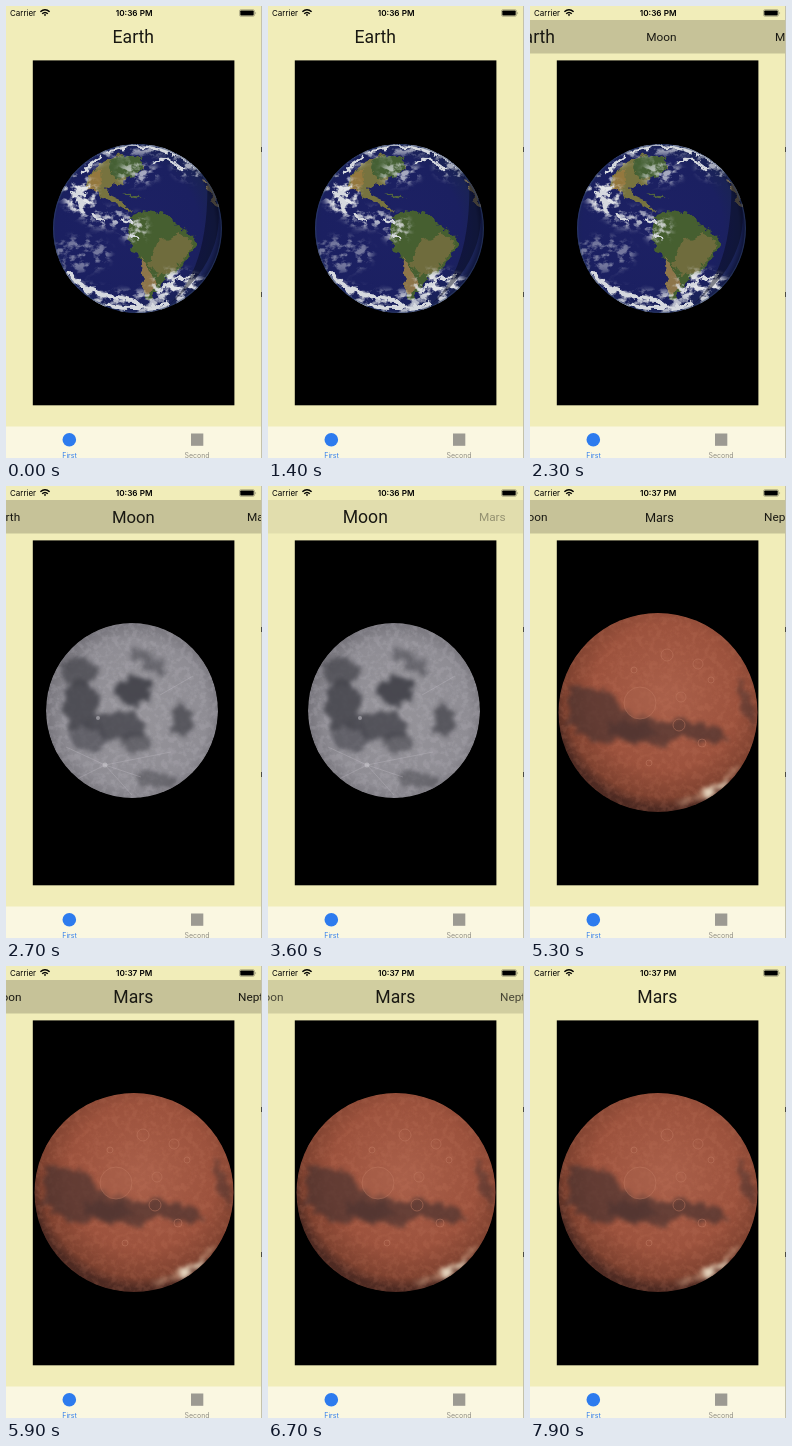
An HTML page for the animation above (8000 ms loop, 256 by 452 pixels).

```html
<!DOCTYPE html>
<html lang="en">
<head>
<meta charset="utf-8">
<title>Planet titles</title>
<style>
  html, body { margin: 0; width: 100%; height: 100%; overflow: hidden; background: #f1edb9; }
  svg { display: block; width: 100vw; height: 100vh; }
  text { text-anchor: middle; font-family: Inter, Roboto, sans-serif; }
  .title { font-family: Roboto, "Open Sans", sans-serif; fill: #191812; }
  .tab { font-size: 7px; }
  filter { color-interpolation-filters: sRGB; }
</style>
</head>
<body>
<svg viewBox="0 0 256 452" preserveAspectRatio="none">
  <defs>
    <filter id="rough" x="-20%" y="-20%" width="140%" height="140%">
      <feTurbulence type="fractalNoise" baseFrequency=".13" numOctaves="3" seed="4" result="noise"/>
      <feDisplacementMap in="SourceGraphic" in2="noise" scale="9" xChannelSelector="R" yChannelSelector="G"/>
      <feGaussianBlur stdDeviation=".6"/>
    </filter>
    <filter id="softRough" x="-30%" y="-30%" width="160%" height="160%">
      <feTurbulence type="fractalNoise" baseFrequency=".1" numOctaves="4" seed="9" result="noise"/>
      <feDisplacementMap in="SourceGraphic" in2="noise" scale="16" xChannelSelector="R" yChannelSelector="G"/>
      <feGaussianBlur stdDeviation="2"/>
    </filter>
    <!-- Noise patches that keep the colour of the shape they are applied to. -->
    <filter id="wisps" x="0" y="0" width="100%" height="100%">
      <feTurbulence type="fractalNoise" baseFrequency=".1 .14" numOctaves="4" seed="12"/>
      <feColorMatrix values="0 0 0 0 0  0 0 0 0 0  0 0 0 0 0  5 0 0 0 -2.3" result="mask"/>
      <feGaussianBlur in="SourceGraphic" stdDeviation="3"/>
      <feComposite in2="mask" operator="in"/>
    </filter>
    <filter id="specks" x="0" y="0" width="100%" height="100%">
      <feTurbulence type="fractalNoise" baseFrequency=".16" numOctaves="3" seed="7"/>
      <feColorMatrix values="0 0 0 0 0  0 0 0 0 0  0 0 0 0 0  4 0 0 0 -1.7" result="mask"/>
      <feComposite in="SourceGraphic" in2="mask" operator="in"/>
    </filter>
    <radialGradient id="sea" cx=".45" cy=".5" r=".55">
      <stop stop-color="#1d2164"/><stop offset=".75" stop-color="#1b2061"/>
      <stop offset=".92" stop-color="#1a2356"/><stop offset="1" stop-color="#0b1030"/>
    </radialGradient>
    <radialGradient id="rock" cx=".52" cy=".52" r=".52">
      <stop stop-color="#96949a"/><stop offset=".8" stop-color="#8f8d94"/><stop offset="1" stop-color="#76747b"/>
    </radialGradient>
    <radialGradient id="rust" cx=".54" cy=".42" r=".56">
      <stop stop-color="#aa604a"/><stop offset=".65" stop-color="#9c523d"/>
      <stop offset=".9" stop-color="#7f4230"/><stop offset="1" stop-color="#4e2a22"/>
    </radialGradient>
    <clipPath id="earthDisc"><circle cx="131.5" cy="222.5" r="84.5"/></clipPath>
    <clipPath id="moonDisc"><ellipse cx="126" cy="224.5" rx="86" ry="87.5"/></clipPath>
    <clipPath id="marsDisc"><circle cx="128" cy="226.5" r="99.5"/></clipPath>
  </defs>

  <rect width="256" height="452" fill="#f1edb9"/>
  <rect id="bar" y="14" width="256" height="33.5"/>
  <g id="titles"></g>

  <rect x="26.8" y="54.4" width="201.6" height="344.9"/>

  <g class="planet" clip-path="url(#earthDisc)">
    <circle cx="131.5" cy="222.5" r="85" fill="url(#sea)"/>
    <g filter="url(#rough)">
      <path fill="#77733f" d="M77 182 83 169 95 157 115 148 135 152 138 163 121 172 118 179 105 177 99 182 106 190 117 195 124 206 112 199 94 190 86 177Z"/>
      <path fill="#456034" d="M105 153 120 148 136 153 136 164 120 173 108 172 102 162Z"/>
      <path fill="#94783e" d="M80 180 87 167 95 162 96 178 90 186Z"/>
      <path fill="#465f30" d="M127 209 140 204 158 208 170 218 187 230 191 237 183 248 176 261 165 269 153 282 146 294 139 292 137 276 136 258 124 240 121 226Z"/>
      <path fill="#6f6c3d" d="M152 235 174 228 187 235 176 257 164 267 151 270 143 258Z"/>
      <path fill="#8d754a" d="M134 250 143 262 149 277 144 291 138 286Z"/>
      <path fill="#75694f" d="M198 174 207 180 216 202 209 199Z"/>
      <path fill="#53663f" d="M117 187 130 189 139 193 128 192Z"/>
    </g>
    <g fill="#e2e4e8" filter="url(#wisps)">
      <path d="M40 130H220V150Q190 155 150 150T90 160T40 200Z" opacity=".7"/>
      <ellipse cx="75" cy="190" rx="17" ry="20"/>
      <ellipse cx="100" cy="212" rx="22" ry="10" opacity=".8"/>
      <ellipse cx="128" cy="222" rx="14" ry="14" opacity=".8"/>
      <ellipse cx="132" cy="167" rx="20" ry="12" opacity=".7"/>
      <ellipse cx="185" cy="160" rx="18" ry="14" opacity=".7"/>
      <ellipse cx="75" cy="248" rx="30" ry="18" opacity=".45"/>
      <ellipse cx="170" cy="278" rx="26" ry="14"/>
      <path d="M40 250Q80 290 130 285T220 270V310H40Z" opacity=".8"/>
    </g>
    <g filter="url(#rough)" fill="none" stroke="#d6d9df" stroke-linecap="round">
      <path stroke-width="5" d="M62 267Q79 287 105 290T134 300"/>
      <path stroke-width="4" d="M90 297Q120 306 160 299"/>
      <path stroke-width="3" d="M154 286Q165 272 187 270"/>
      <path stroke-width="5" d="M68 187 79 188M74 195 77 205"/>
      <path stroke-width="3" d="M87 210 97 215M117 214 126 217M125 226 131 232"/>
      <path stroke-width="2.5" d="M101 146Q130 136 157 144T194 165M146 157 161 152 178 164M77 166 95 151"/>
    </g>
    <path d="M205 170Q235 250 150 308Q206 275 201 165Z" fill="#050818" opacity=".45"/>
    <circle cx="131.5" cy="222.5" r="84" fill="none" stroke="#33466f" stroke-width="1.5" opacity=".5"/>
  </g>

  <g class="planet" clip-path="url(#moonDisc)">
    <ellipse cx="126" cy="224.5" rx="86" ry="88" fill="url(#rock)"/>
    <rect x="40" y="137" width="172" height="175" fill="#bebcc4" opacity=".22" filter="url(#specks)"/>
    <g filter="url(#softRough)" fill="#44444b">
      <ellipse cx="74" cy="186" rx="18" ry="15" opacity=".75"/>
      <ellipse cx="128" cy="206" rx="18" ry="15" opacity=".95"/>
      <ellipse cx="75" cy="219" rx="18" ry="24" opacity=".85"/>
      <ellipse cx="113" cy="239" rx="27" ry="15" opacity=".8"/>
      <ellipse cx="82" cy="252" rx="17" ry="16" opacity=".6"/>
      <ellipse cx="176" cy="235" rx="11" ry="15" opacity=".75"/>
      <ellipse cx="130" cy="255" rx="15" ry="10" opacity=".6"/>
      <ellipse cx="151" cy="294" rx="21" ry="8" opacity=".5"/>
      <path d="M122 163 150 170 162 189 143 186Z" opacity=".55"/>
    </g>
    <g fill="none" stroke="#d0ced4" stroke-width=".8" opacity=".3">
      <path d="M99 279 60 261M99 279 67 295M99 279 126 309M99 279 165 266M99 279 135 291M154 209 187 190"/>
    </g>
    <g fill="#d2d0d6" opacity=".5"><circle cx="99" cy="279" r="2.5"/><circle cx="92" cy="232" r="2"/></g>
  </g>

  <g class="planet" clip-path="url(#marsDisc)">
    <circle cx="128" cy="226.5" r="100" fill="url(#rust)"/>
    <rect x="28" y="127" width="200" height="200" fill="#d08468" opacity=".14" filter="url(#specks)"/>
    <g filter="url(#softRough)" fill="#44302e">
      <path d="M40 198 78 205 92 222 122 235 155 233 192 244 195 256 153 251 132 260 91 255 61 257 38 237Z" opacity=".65"/>
      <path d="M76 234 110 238 131 246 110 255 80 250Z" opacity=".5"/>
      <path d="M207 190 224 215 222 241 212 227Z" opacity=".5"/>
    </g>
    <g fill="none" stroke="#c07b63" stroke-width="1" opacity=".5">
      <circle cx="110" cy="217" r="16" fill="#a7604a"/>
      <circle cx="137" cy="169" r="6"/><circle cx="168" cy="178" r="5"/><circle cx="151" cy="211" r="5"/>
      <circle cx="149" cy="239" r="6"/><circle cx="181" cy="194" r="3"/><circle cx="104" cy="184" r="3"/>
      <circle cx="172" cy="257" r="4"/><circle cx="119" cy="277" r="3"/>
    </g>
    <g filter="url(#softRough)" fill="none" stroke-linecap="round">
      <path d="M151 317Q185 309 208 280" stroke="#c69a7f" stroke-width="5" opacity=".6"/>
      <path d="M176 309 197 297" stroke="#eee0c8" stroke-width="5"/>
    </g>
  </g>

  <text x="17" y="10" font-size="8">Carrier</text>
  <g fill="none" stroke="#000" stroke-width="1.5">
    <path d="M34.4 5.8Q39 1.6 43.6 5.8M36.2 7.8Q39 5.2 41.8 7.8"/>
    <path d="M37.8 8.8 39 8 40.2 8.8 39 10.2Z" fill="#000" stroke="none"/>
  </g>
  <text id="clock" x="128.1" y="10" font-size="8.2" font-weight="600"></text>
  <rect x="233.5" y="3.6" width="15" height="6.8" rx="1.6" fill="none" stroke="#000" stroke-width=".6" opacity=".4"/>
  <rect x="234.3" y="4.4" width="13.4" height="5.2" rx=".8"/>
  <path d="M249.4 5.8q1.6 1.3 0 2.6z" opacity=".4"/>

  <rect y="420.5" width="256" height="32" fill="#faf7e1"/>
  <circle cx="63.3" cy="433.8" r="6.8" fill="#2d7bee"/>
  <text class="tab" x="63.5" y="452" fill="#2d7bee">First</text>
  <rect x="185" y="427.5" width="12.3" height="12.3" fill="#9c9a92"/>
  <text class="tab" x="191" y="452" fill="#918f87">Second</text>

  <path d="M255.5 0V452" stroke="#c4c2ac" stroke-width="1"/>
  <path d="M255.5 141v5M255.5 286v5" stroke="#4c4b45" stroke-width="1"/>
</svg>

<script>
  const DURATION = 8000, STEP = 100, CENTER = 127.3, SPACING = 127;
  const SMALL = 11.8, LARGE = 17.6;
  const names = ["Earth", "Moon", "Mars", "Neptune"];
  const selectedAt = [-1000, 2400, 5200];

  // Each step is [time, value].
  const scroll = [[1300, 0], [1400, 20], [1500, 43], [1700, 85], [1900, 108], [2100, 118], [2300, 123], [2500, 127],
    [3450, 127], [3600, 157], [3800, 195], [4100, 222], [4500, 240], [5000, 249], [5300, 252], [5500, 254]];
  const barFade = [[1400, 0], [1700, 1], [3000, 1], [3400, 0], [3480, 0], [3600, .38], [3850, 1],
    [6550, 1], [6700, .75], [7000, 0]];

  const byId = id => document.getElementById(id);
  const planets = document.querySelectorAll(".planet");
  const titles = names.map(name => {
    const label = document.createElementNS("http://www.w3.org/2000/svg", "text");
    label.textContent = name;
    label.setAttribute("class", "title");
    return byId("titles").appendChild(label);
  });

  function valueAt(steps, time) {
    const next = steps.findIndex(step => step[0] > time);
    if (next === 0) return steps[0][1];
    if (next < 0) return steps[steps.length - 1][1];
    const [t0, v0] = steps[next - 1], [t1, v1] = steps[next];
    return v0 + (v1 - v0) * (time - t0) / (t1 - t0);
  }

  function draw(time) {
    const selected = selectedAt.filter(t => t <= time).length - 1;
    const grown = Math.min(1, (time - selectedAt[selected]) / 400);
    const eased = grown * grown * (3 - 2 * grown);
    const offset = valueAt(scroll, time);
    const fade = valueAt(barFade, time);

    byId("bar").setAttribute("opacity", .18 * fade);
    byId("clock").textContent = time < 4400 ? "10:36 PM" : "10:37 PM";
    planets.forEach((planet, i) => planet.style.display = i === selected ? "" : "none");
    titles.forEach((label, i) => {
      const size = i === selected ? SMALL + (LARGE - SMALL) * eased : SMALL;
      label.setAttribute("x", CENTER + i * SPACING - offset);
      label.setAttribute("y", 31 + size * .355);
      label.setAttribute("font-size", size);
      label.setAttribute("opacity", i === selected ? 1 : fade);
    });
  }

  const start = performance.now();
  function tick() {
    const time = (performance.now() - start) % DURATION;
    draw(Math.floor(time / STEP) * STEP);
    requestAnimationFrame(tick);
  }
  tick();
</script>
</body>
</html>
```
